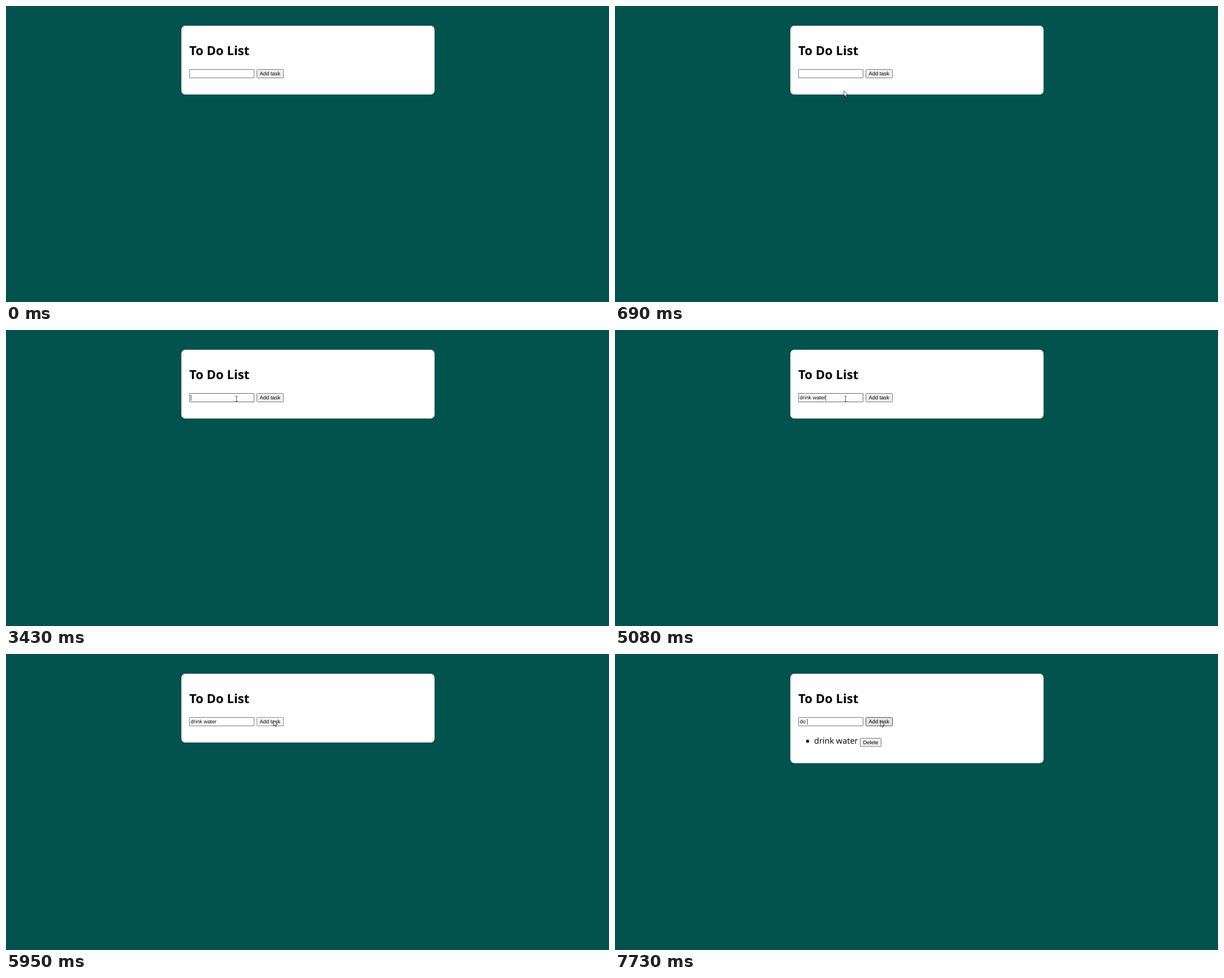
Write an HTML page that moves like this. It is 1066 px wide and 525 px high and loops after 8 s.

```html
<!DOCTYPE html>
<html lang="en">
<head>
<meta charset="utf-8">
<title>To Do List</title>
<style>
  html, body { margin: 0; width: 100%; height: 100%; overflow: hidden; background: #02524d; }
  svg { display: block; width: 1066px; height: 525px; }
  text { white-space: pre; text-rendering: geometricPrecision; }
  .title { font: 700 22.1px "Open Sans", sans-serif; }
  .item { font: 14.56px "Open Sans", sans-serif; }
  .ui { font: 9.333px "Liberation Sans", Arial, sans-serif; }
  .field { fill: #fff; stroke: #767676; }
  .field.hover { stroke: #686868; }
  .button { fill: #efefef; stroke: #767676; }
  .button.hover { fill: #e5e5e5; stroke: #4f4f4f; }
  .button.active { fill: #f5f5f5; stroke: #8d8d8d; }
</style>
</head>
<body>
<svg viewBox="0 0 1066 525">
  <rect id="card" x="310" y="35" width="447.6" height="122" rx="7" fill="#fff"/>
  <text class="title" x="324" y="87">To Do List</text>

  <rect id="field" class="field" x="324.5" y="112.5" width="114" height="15" rx=".5"/>
  <text id="typed" class="ui" x="326.6" y="123"></text>
  <rect id="caret" y="115" width=".8" height="10.5"/>

  <rect id="add" class="button" x="443.5" y="112.5" width="47" height="15" rx="1"/>
  <text class="ui" x="448.6" y="123">Add task</text>

  <g id="task">
    <circle cx="340.5" cy="154.7" r="2.7"/>
    <text class="item" x="352" y="159.4">drink water</text>
    <rect class="button" x="433.5" y="149.5" width="37" height="14.5" rx="1"/>
    <text class="ui" x="438.5" y="159.5">Delete</text>
  </g>

  <path id="arrow" d="M0 0V9.6L2.2 7.6L3.7 11L5.3 10.3L3.8 7H6.8Z" fill="#fff" stroke="#000" stroke-width=".7"/>
  <path id="beam" d="M-2-4.5H2M0-4.5V4.5M-2 4.5H2" fill="none" stroke="#333" stroke-width=".8"/>
</svg>
<script>
const LOOP = 8000, ENTER = 110, FOCUS = 2430, PRESS = 5950, RELEASE = 6120, BLINK = 500;
const $ = id => document.getElementById(id);
const [card, field, typed, caret, add, task, arrow, beam] =
  ["card", "field", "typed", "caret", "add", "task", "arrow", "beam"].map($);

// each move curves from the end of the previous one through a bend point
const moves = [
  { start: ENTER, end: 930, bend: [398, 250], to: [401, 129] },
  { start: 1230, end: 1620, bend: [404, 125], to: [407.5, 122] },
  { start: 5410, end: 5900, bend: [446, 92], to: [473, 118] },
  { start: RELEASE, end: 6260, bend: [471, 118], to: [469.5, 119] }
];
// pace 1 is a steady rhythm; above 1 the keys slow down
const drink = { text: "drink water", first: 3530, last: 5080, pace: 1 };
const next = { text: "do ", first: 7260, last: 7730, pace: 2.5 };

const show = (el, on) => el.setAttribute("visibility", on ? "visible" : "hidden");
const easeOut = k => 1 - (1 - k) ** 2;

function pointer(t) {
  let at = [998, 514];
  for (const { start, end, bend, to } of moves) {
    const u = easeOut(Math.min(1, Math.max(0, (t - start) / (end - start))));
    at = at.map((v, i) => (1 - u) ** 2 * v + 2 * u * (1 - u) * bend[i] + u * u * to[i]);
  }
  return at;
}

function keyTimes({ text, first, last, pace }) {
  return [...text].map((_, i) => first + (last - first) * (i / (text.length - 1)) ** pace);
}

function draw(t) {
  const added = t >= RELEASE;
  const pressed = t >= PRESS && !added;
  const focused = t >= FOCUS && !pressed;
  const [x, y] = pointer(t);
  const inRow = y > 112 && y < 128;
  const overField = inRow && x > 324 && x < 439;
  const overAdd = inRow && x > 443 && x < 491;

  const entry = added ? next : drink;
  const keys = keyTimes(entry).filter(k => k <= t + 0.01);
  typed.textContent = entry.text.slice(0, keys.length);
  const width = keys.length ? typed.getComputedTextLength() : 0;
  caret.setAttribute("x", 326.6 + width);

  // the blink restarts at focus and at each key press
  const since = t - (keys.length ? keys[keys.length - 1] : added ? RELEASE : FOCUS);
  show(caret, focused && Math.floor(since / BLINK) % 2 === 0);

  field.setAttribute("class", overField ? "field hover" : "field");
  add.setAttribute("class", "button" + (pressed ? " active" : overAdd ? " hover" : ""));
  card.setAttribute("height", added ? 158.5 : 122);
  show(task, added);

  for (const el of [arrow, beam]) el.setAttribute("transform", `translate(${x} ${y})`);
  show(arrow, t >= ENTER && !overField);
  show(beam, overField);
}

const start = performance.now();
function tick() {
  draw((performance.now() - start) % LOOP);
  requestAnimationFrame(tick);
}
tick();
</script>
</body>
</html>
```
